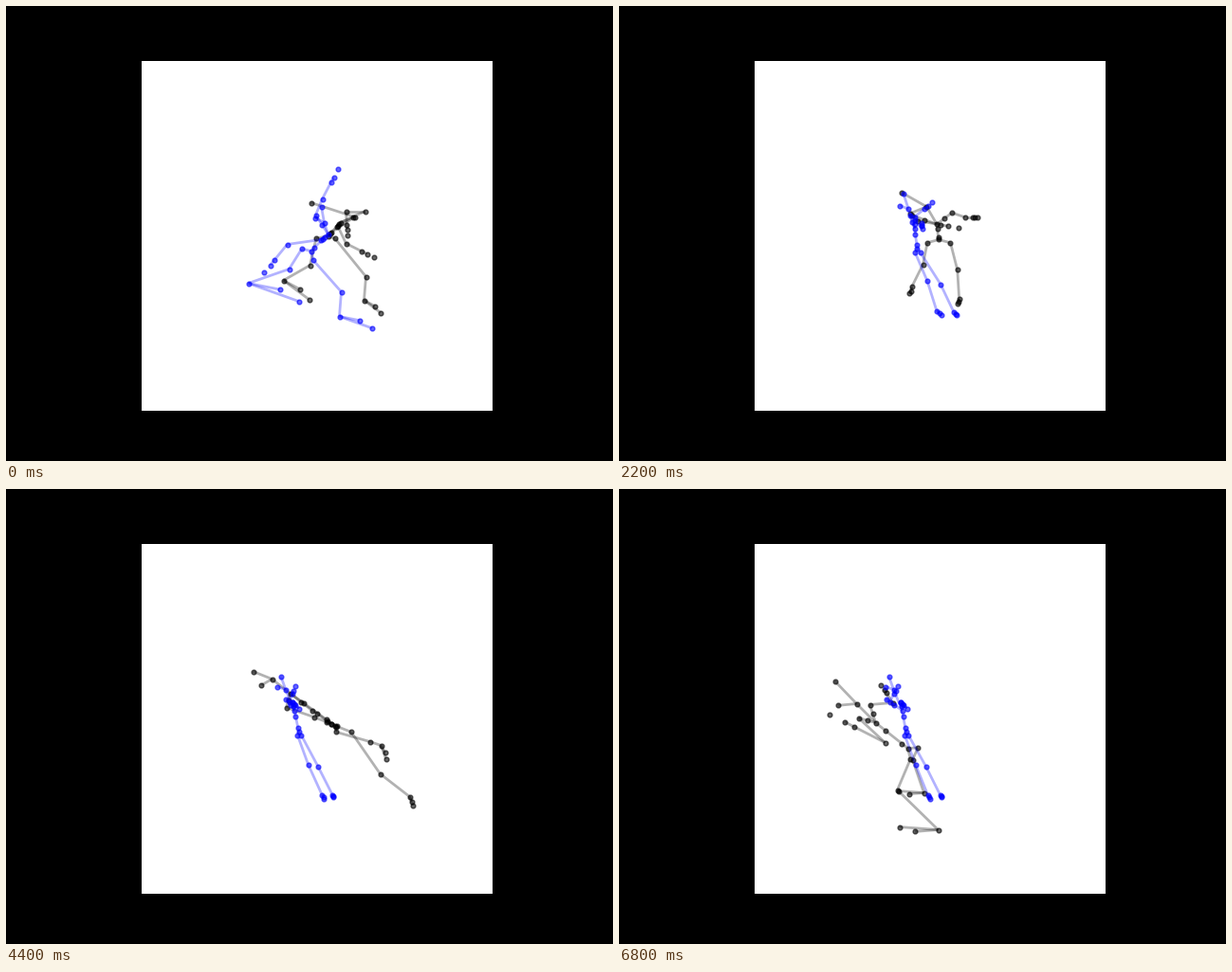
Animation, 640 px wide and 480 px high, one loop 6.9 s. Source, as a matplotlib script:

```python
import numpy as np
import matplotlib.pyplot as plt
from matplotlib.animation import FuncAnimation
from matplotlib.collections import LineCollection

W, H, DPI = 640, 480, 100
STEP, FRAMES = 100, 69
SIDE, LEFT, TOP = 369.6, 143.2, 57.6

# Joints: pelvis, two spine joints, neck, head, crown, nose, then
# arms (clavicle, shoulder, elbow, wrist, hand, loose tip)
# and legs (hip, knee, ankle, two toes).
BONES = [(0, 1), (1, 2), (2, 3), (3, 4), (4, 5), (4, 6)]
for arm in (7, 13):
    BONES += [(3, arm)] + [(arm + i, arm + i + 1) for i in range(4)]
for leg in (19, 24):
    BONES += [(0, leg), (leg, leg + 1), (leg + 1, leg + 2),
              (leg + 2, leg + 3), (leg + 2, leg + 4)]


def mix(a, b, u):
    return a + (b - a) * u


def pose(torso, arm_a, arm_b, leg_a, leg_b, foot, hips):
    """Key points as x + yj: pelvis, neck, head, crown; shoulder, elbow,
    hand; knee, ankle; then the foot vector and half the hip width."""
    return np.array([*torso, *arm_a, *arm_b, *leg_a, *leg_b, foot, hips],
                    complex)


def skeleton(key):
    """Build all joints from the key points of a pose."""
    pelvis, neck, head, crown = key[:4]
    foot, hips = key[14:]
    nose = head + 0.6 * (crown - head) * np.exp(-0.9j)
    out = [pelvis, mix(pelvis, neck, 0.18), mix(pelvis, neck, 0.7),
           neck, head, crown, nose]
    for shoulder, elbow, hand in (key[4:7], key[7:10]):
        out += [mix(neck, shoulder, 0.5), shoulder, elbow,
                mix(elbow, hand, 0.75), hand, mix(elbow, hand, 1.35)]
    seat = mix(neck, pelvis, 1.2)
    for (knee, ankle), side, size in ((key[10:12], -1, 1),
                                      (key[12:14], 1, 0.65)):
        toe = foot * size
        out += [seat + side * hips, knee, ankle,
                ankle + toe, ankle + 0.6 * toe * np.exp(-0.15j)]
    out = np.array(out) - 0.5 - 0.5j
    return np.column_stack([out.real, out.imag])


class Dancer:
    """A stick figure moving smoothly through a few key poses."""

    def __init__(self, ax, color, z, keys):
        self.t = np.array(list(keys), float)
        self.p = np.array(list(keys.values())).view(float)
        slope = np.diff(self.p, axis=0) / np.diff(self.t)[:, None]
        a, b = slope[:-1], slope[1:]
        same = a * b > 0
        mean = np.where(same, 2 * a * b / np.where(same, a + b, 1), 0)
        self.v = np.concatenate([slope[:1], mean, slope[-1:]])
        self.lines = LineCollection([], colors=color, alpha=0.3,
                                    linewidths=2, zorder=z)
        ax.add_collection(self.lines)
        self.dots = ax.scatter([], [], s=12, c=color, alpha=0.6,
                               linewidths=1, zorder=z + 1)

    def at(self, t):
        i = min(np.searchsorted(self.t, t, side="right") - 1, len(self.t) - 2)
        d = self.t[i + 1] - self.t[i]
        u = (t - self.t[i]) / d
        p, v = self.p, self.v
        return (mix(p[i], p[i + 1], u * u * (3 - 2 * u))
                + u * (1 - u) * d * mix(v[i], -v[i + 1], u)).view(complex)

    def show(self, t):
        pts = skeleton(self.at(t))
        self.lines.set_segments([pts[[a, b]] for a, b in BONES])
        self.dots.set_offsets(pts)


leaper = {
    0: pose([340+243j, 353+229j, 368+223j, 322+208j],
            [350+232j, 359+251j, 381+262j], [379+217j, 359+217j, 360+236j],
            [321+274j, 293+290j], [380+286j, 378+311j], 27+20j, 10),
    1500: pose([343+244j, 348+230j, 354+219j, 319+202j],
               [344+229j, 343+227j, 356+241j], [359+216j, 366+234j, 365+247j],
               [327+274j, 312+295j], [373+282j, 374+309j], 17+15j, 10),
    2900: pose([328+253j, 319+232j, 295+207j, 279+194j],
               [269+215j, 284+227j, 335+228j], [344+224j, 365+213j, 384+200j],
               [307+272j, 302+299j], [337+277j, 346+311j], -18-2j, 15),
    3800: pose([318+272j, 305+246j, 285+224j, 279+203j],
               [253+227j, 267+249j, 269+268j], [332+236j, 358+260j, 368+247j],
               [254+272j, 262+305j], [321+286j, 349+329j], -18-8j, 16),
    4400: pose([347+250j, 300+216j, 281+201j, 261+193j],
               [296+231j, 325+241j, 343+248j], [323+234j, 328+237j, 343+248j],
               [384+267j, 396+271j], [395+301j, 426+325j], 5+14j, 8),
    5300: pose([319+272j, 281+242j, 257+224j, 263+199j],
               [242+234j, 255+253j, 286+238j], [287+229j, 318+223j, 319+205j],
               [267+294j, 293+334j], [306+279j, 330+321j], -42-4j, 8),
    6800: pose([305+274j, 271+247j, 251+227j, 228+203j],
               [253+242j, 281+268j, 238+246j], [265+228j, 289+226j, 280+212j],
               [294+318j, 337+360j], [310+286j, 322+321j], -41-3j, 4-6j),
}

stander = {
    0: pose([322+259j, 340+241j, 336+229j, 333+212j],
            [332+247j, 297+252j, 279+274j], [327+221j, 334+204j, 346+181j],
            [299+278j, 256+293j], [354+302j, 352+328j], 53+19j, 6+6j),
    1500: pose([317+257j, 317+237j, 314+219j, 309+201j],
               [319+229j, 325+242j, 329+240j], [311+221j, 317+219j, 338+208j],
               [327+289j, 334+320j], [346+296j, 357+325j], 11+5j, 4),
    2900: pose([313+256j, 309+234j, 300+212j, 295+198j],
               [307+225j, 314+232j, 309+227j], [304+222j, 308+225j, 314+213j],
               [323+291j, 336+323j], [334+293j, 349+323j], 2+4j, 2),
}
# Drift left to the end of the loop while the raised arm folds in.
rest = stander[2900].copy()
rest[:14] -= 10
rest[7:10] -= 12
stander[6800] = rest

fig = plt.figure(figsize=(W / DPI, H / DPI), dpi=DPI, facecolor="black")
ax = fig.add_axes([LEFT / W, 1 - (TOP + SIDE) / H, SIDE / W, SIDE / H])
ax.set(xlim=(LEFT, LEFT + SIDE), ylim=(TOP + SIDE, TOP), xticks=[], yticks=[])
ax.spines[:].set_visible(False)
dancers = [Dancer(ax, "black", 1, leaper), Dancer(ax, "blue", 3, stander)]


def draw(n):
    for dancer in dancers:
        dancer.show(n * STEP)


anim = FuncAnimation(fig, draw, frames=FRAMES, interval=STEP,
                     init_func=lambda: draw(0), repeat=True, repeat_delay=0)
plt.show()
```
